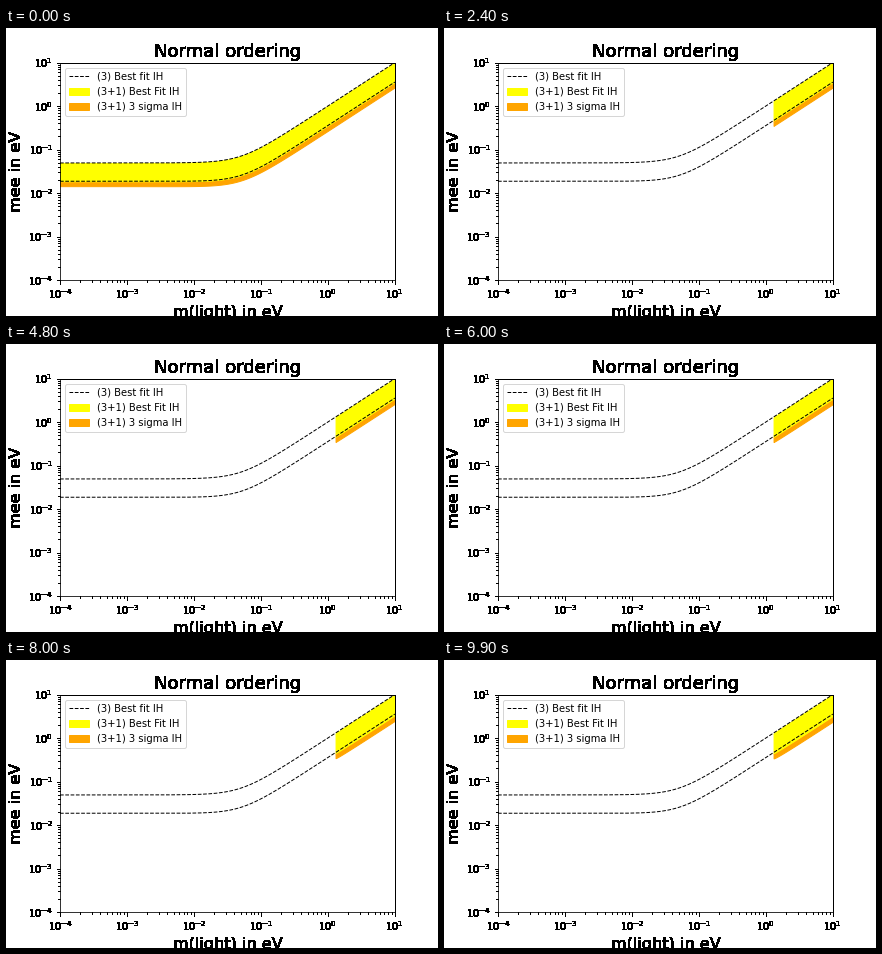
Recreate the animation shown at these times as a matplotlib script. Size 432 px wide and 288 px high, loop 10000 ms.

```python
import numpy as np
import matplotlib.pyplot as plt
from matplotlib.animation import FuncAnimation

FRAMES = 100
DM41 = 1.7           # sterile mass splitting, eV^2
S14_MAX = 0.025      # largest sin^2(theta14)

plt.rcParams.update({
    "font.family": "DejaVu Sans",
    "font.size": 10,
    "figure.subplot.bottom": 0.125,
})


def solid(img, dpi):
    """Turn every touched pixel fully black."""
    out = np.zeros_like(img)
    out[..., 3] = img[..., 3] > 0
    return out, 0, 0


def mee_range(m, s12, s13, dm31=2.5e-3, dm21=7.4e-5):
    """Largest and smallest effective mass, inverted hierarchy."""
    c13 = 1 - s13
    a = (1 - s12) * c13 * np.sqrt(m**2 + dm31)
    b = s12 * c13 * np.sqrt(m**2 + dm31 + dm21)
    c = s13 * m
    return a + b + c, a - b - c


def bands(i):
    """Mass grid with the three band edges at step i."""
    if i == 0:
        m, s14, m4 = np.logspace(-4, 1, 500), 0.0, 0.0
    else:
        m = np.logspace(np.log10(DM41) / 2, 1, 200)
        s14 = S14_MAX * (i / FRAMES) ** 2
        m4 = np.sqrt(np.maximum(m**2 - DM41, 0))
    top, low = mee_range(m, 0.307, 0.022)
    low3 = mee_range(m, 0.35, 0.024)[1]
    c14 = 1 - s14
    return m, c14 * top + s14 * m4, c14 * low - s14 * m4, c14 * low3 - s14 * m4


def outline(m, upper, lower):
    return [np.column_stack([np.r_[m, m[::-1]], np.r_[upper, lower[::-1]]])]


fig, ax = plt.subplots(figsize=(6, 4), dpi=72, facecolor="white")
ax.set(xscale="log", yscale="log", xlim=(1e-4, 10), ylim=(1e-4, 10))
title = ax.set_title("Normal ordering", fontsize=18)
ax.set_xlabel("m(light) in eV", fontsize=16)
ax.set_ylabel("mee in eV", fontsize=16)
for artist in (title, ax.xaxis, ax.yaxis, ax.spines["top"], ax.spines["right"]):
    artist.set_agg_filter(solid)

grid = np.logspace(-4, 1, 500)
best_top, best_low = mee_range(grid, 0.307, 0.022)
ax.plot(grid, best_top, "k--", lw=1, label="(3) Best fit IH")
ax.plot(grid, best_low, "k--", lw=1)

m, top, low, low3 = bands(0)
sigma = ax.fill_between(m, low, low3, color="orange", label="(3+1) 3 sigma IH")
best = ax.fill_between(m, top, low, color="yellow", label="(3+1) Best Fit IH")
ax.legend(handles=[ax.lines[0], best, sigma], loc="upper left")


def update(i):
    m, top, low, low3 = bands(i)
    best.set_verts(outline(m, top, low))
    sigma.set_verts(outline(m, low, low3))
    return best, sigma


anim = FuncAnimation(fig, update, frames=FRAMES, interval=100,
                     repeat=True, repeat_delay=0)
plt.show()
```
